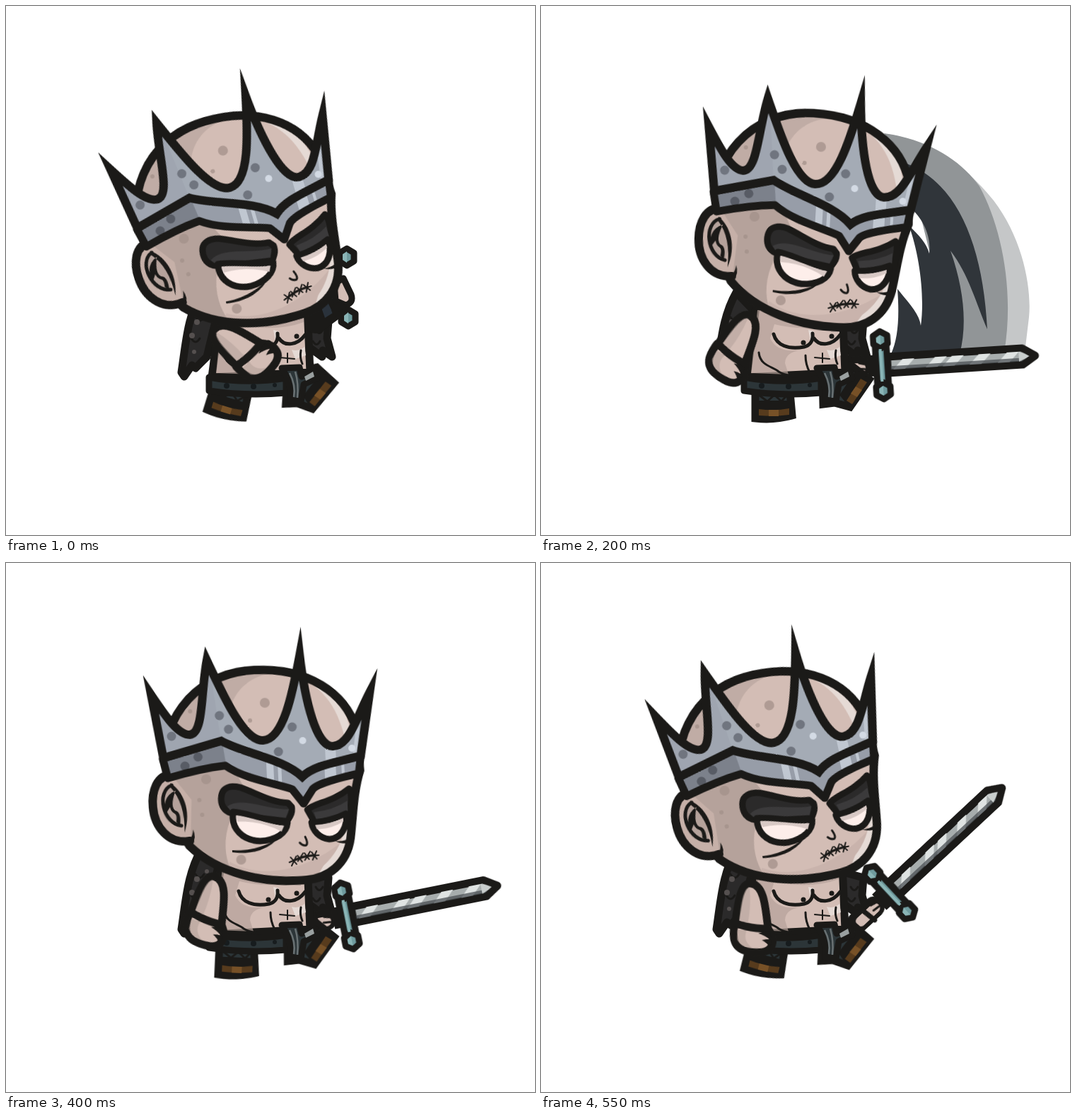
An HTML page without scripts that plays this animation: 748 px wide and 748 px high, repeating every 600 ms.

```html
<!DOCTYPE html>
<html lang="en">
<head>
<meta charset="utf-8">
<title>Sword swing</title>
<style>
  html, body { margin: 0; width: 100%; height: 100%; overflow: hidden; background: #fff; }
  svg { display: block; width: 100vw; height: 100vh; }

  .ink { stroke: #1b1a18; stroke-width: 11; stroke-linejoin: round; stroke-linecap: round; }
  .line { fill: none; }
  .w2 { stroke-width: 2; }
  .w3 { stroke-width: 3; }
  .w5 { stroke-width: 5; }
  .w9 { stroke-width: 9; }
  .w12 { stroke-width: 12; }
  .w30 { stroke-width: 30; }
  .spiked { stroke-linejoin: miter; stroke-miterlimit: 20; }
  .black { fill: #1b1a18; }
  .skin { fill: #d3bdb5; }
  .shade { fill: #b5a29b; }
  .glow { fill: #e5dad5; }
  .steel { fill: #a4abb5; }
  .teal { fill: #6f9b9e; }
  .cloth { fill: #2c3538; }
  .cape { fill: #2b2a2a; }
  .boot { fill: #573b1d; }

  /* Poses advance every 50 ms; steps(2) adds one in-between per 100 ms. */
  .head, .arm, .sword, .leg, .foot, .pommel, .fist { animation: 600ms steps(2) infinite; }
  .head { animation-name: nod; transform-origin: 365px 450px; }
  .arm { animation-name: arm; }
  .leg { animation-name: leg; transform-origin: 335px 515px; }
  .foot { animation-name: foot; transform-origin: 405px 525px; }
  .sword { animation-name: swing, drawn; animation-timing-function: steps(2), step-end; }
  .pommel { animation-name: drop, raised; animation-timing-function: steps(2), step-end; }
  .fist { animation-name: fist; animation-timing-function: step-end; }
  .slash { animation: slash 600ms step-end infinite; }

  @keyframes nod {
    0%, 100% { transform: translateX(0) rotate(-16.3deg); }
    16.6667% { transform: translateX(5px) rotate(-11.1deg); }
    33.3333% { transform: translateX(3px) rotate(3.4deg); }
    50%      { transform: translateX(1.5px) rotate(1.1deg); animation-timing-function: step-end; }
    58.3333% { transform: translateX(0) rotate(0deg); }
    75%      { transform: translateX(0) rotate(-5.5deg); }
    91.6667% { transform: translateX(0) rotate(-12.6deg); animation-timing-function: step-end; }
  }
  @keyframes arm {
    0%, 100% { transform: translate(305px, 468px) rotate(-46deg); }
    16.6667% { transform: translate(297px, 463px) rotate(0deg); }
    33.3333% { transform: translate(287px, 450px) rotate(34deg); }
    50%      { transform: translate(288px, 453px) rotate(27deg); animation-timing-function: step-end; }
    58.3333% { transform: translate(289px, 455px) rotate(24deg); }
    75%      { transform: translate(290px, 460px) rotate(14deg); }
    91.6667% { transform: translate(294px, 468px) rotate(6deg); animation-timing-function: step-end; }
  }
  @keyframes leg {
    0%, 100% { transform: rotate(17deg); }
    16.6667% { transform: rotate(8deg); }
    33.3333%, 58.3333% { transform: rotate(0deg); }
    75%      { transform: rotate(5deg); }
    91.6667% { transform: rotate(14deg); animation-timing-function: step-end; }
  }
  @keyframes foot {
    0%, 100% { transform: rotate(5deg); }
    16.6667%, 75% { transform: rotate(2deg); }
    33.3333%, 58.3333% { transform: rotate(0deg); }
    91.6667% { transform: rotate(4deg); animation-timing-function: step-end; }
  }
  @keyframes swing {
    0%, 25%  { transform: translate(505px, 455px) rotate(-50deg); animation-timing-function: step-end; }
    33.3333% { transform: translate(482px, 508px) rotate(-3.6deg); }
    50%      { transform: translate(480px, 508px) rotate(-3.4deg); animation-timing-function: step-end; }
    58.3333% { transform: translate(478px, 508px) rotate(-3deg); }
    75%      { transform: translate(486px, 490px) rotate(-19.7deg); }
    91.6667%, 100% { transform: translate(493px, 466px) rotate(-43deg); }
  }
  @keyframes drop {
    0%  { transform: translate(482px, 355px); }
    16.6667%, 100% { transform: translate(486px, 416px); }
  }
  @keyframes fist {
    0%  { visibility: visible; transform: none; }
    8.3333% { visibility: visible; transform: translate(-6px, 18px); }
    16.6667%, 100% { visibility: hidden; }
  }
  @keyframes drawn  { 0% { visibility: hidden; } 25%, 100% { visibility: visible; } }
  @keyframes raised { 0% { visibility: visible; } 25%, 100% { visibility: hidden; } }
  @keyframes slash  { 0%, 58.3333%, 100% { visibility: hidden; } 33.3333% { visibility: visible; } }
</style>
</head>
<body>
<svg viewBox="0 0 748 748">
  <defs>
    <path id="skull" d="M235,290C224,230 272,151 365,151C442,151 492,190 505,240L508,300C497,330 495,365 490,395C483,432 455,450 425,451C365,454 300,436 262,395C245,365 238,330 235,290Z"/>
    <path id="crown" d="M231,269L218,179C238,212 254,238 270,238C290,237 288,180 299,134C318,180 345,251 373,251C402,251 418,186 430.500,133C435,199 448,264 471,264C495,264 506,226 527,190L510,279C480,287 445,288 426,305C400,278 345,268 314,249Z"/>
    <path id="band" d="M230,270L314,249C345,268 400,278 426,305C445,288 480,287 510,279L506,304C480,309 448,315 440,323L426,343L411,322C390,313 345,305 318,284C290,286 260,292 236,298Z"/>
    <path id="blade" d="M8,-11.500H199L217,0L199,11.500H8Z"/>
    <path id="hex" d="M-10,-6L0,-12L10,-6V6L0,12L-10,6Z"/>
    <clipPath id="inSkull"><use href="#skull"/></clipPath>
    <clipPath id="inCrown"><use href="#crown"/></clipPath>
    <clipPath id="inBand"><use href="#band"/></clipPath>
    <clipPath id="inBlade"><use href="#blade"/></clipPath>
  </defs>

  <g class="slash">
    <path fill="#c5c7c8" d="M490,181C556,192 600,226 640,275C682,330 694,400 690,440L684,490H640L600,240Z"/>
    <path fill="#919597" d="M485,180C550,189 595,220 620,255C650,310 670,400 655,490H585L520,230Z"/>
    <path fill="#30353a" d="M515,222C590,250 625,340 631,457C615,420 605,380 579,346C598,400 603,450 592,492H495C505,470 507,440 504,400C520,420 535,435 537,452C543,410 535,350 520,310C535,325 545,335 549,350C552,325 540,300 520,283Z"/>
  </g>

  <!-- cape -->
  <g class="cape">
    <path class="ink" d="M276,405C256,440 254,480 248,518L252,524L263,508L268,512L284,496L300,430Z"/>
    <path class="ink" d="M420,435L456,445L454,470L461,496L448,487L447,496L425,480Z"/>
    <path class="ink line w3" d="M262,470q6,10 12,0M268,440q6,10 12,0M438,458q5,9 10,0M434,474q5,9 10,0"/>
    <g fill="#55504f"><circle cx="270" cy="447" r="4"/><circle cx="263" cy="466" r="4"/><circle cx="284" cy="436" r="3"/><circle cx="266" cy="489" r="3"/></g>
  </g>

  <!-- forearm holding the sword -->
  <g class="sword">
    <path class="ink line w30" d="M-62,0L-30,0"/>
    <path fill="none" stroke="#d3bdb5" stroke-width="14" stroke-linecap="round" d="M-58,2H-30"/>
    <path class="ink line" d="M-46,-14L-42,14" style="stroke-width:7"/>
    <path class="ink line w3" d="M-24,-3L-32,-5M-24,4L-34,3"/>
  </g>

  <!-- legs -->
  <g class="leg">
    <path class="ink cloth" d="M303,535V583Q330,586 355,579L351,535Z" style="stroke-linejoin:miter"/>
    <path class="ink line w3" d="M308,550l12,9l10,-9l10,9l8,-9"/>
    <path class="black" d="M303,558H354V571H303Z"/>
    <path class="boot" d="M308,570Q330,573 351,569V578Q330,581 308,579Z"/>
    <path fill="#775127" d="M322,571L336,571V580H322Z"/>
  </g>
  <g class="foot">
    <path class="ink cloth" d="M398,520L399,563L415,561L437,567L464,528L438,508Z" style="stroke-linejoin:miter"/>
    <path class="black" d="M422,550L446,514L466,528L438,570Z"/>
    <path class="boot" d="M432,558L452,527L461,532L440,563Z"/>
    <path fill="#775127" d="M438,548L445,538L454,543L447,553Z"/>
  </g>

  <!-- torso -->
  <path class="ink skin" d="M304,425L291,525L430,518L426,425Z"/>
  <path class="shade" d="M306,430H421V447Q380,462 330,450L324,470Q335,492 368,486Q345,490 345,505L350,521L297,519Z" opacity=".7"/>
  <path class="glow" d="M404,486q10,3 18,-4l2,12l-15,5zM378,458l8,2v12l-5,2z"/>
  <g class="ink line w5">
    <path d="M329,464C333,480 350,486 372,482C381,480 385,473 384,463M386,470C394,482 412,480 423,465"/>
    <path class="w3" d="M374,494Q374,507 380,518M417,487Q415,497 419,506M308,490C310,510 330,510 336,517Q344,522 353,522"/>
    <path class="w2" d="M387,497L408,499M398,491V504"/>
  </g>
  <circle class="black" cx="371" cy="476" r="3.500"/><circle class="black" cx="411" cy="467" r="3.500"/>

  <!-- belt -->
  <path class="ink cloth w9" d="M287,525Q340,535 396,526V547Q340,552 287,544Z"/>
  <g fill="#171c1e"><circle cx="312" cy="537" r="4"/><circle cx="350" cy="538" r="4"/><circle cx="380" cy="536" r="3"/></g>
  <path class="ink cloth w9" d="M390,512L415,511L418,524L437,517L440,526L421,535L417,559L402,557Q404,532 390,512Z"/>
  <path fill="#9aa0a0" d="M422,524L434,517L436,524L424,530Z"/>
  <path fill="none" stroke="#697173" stroke-width="2.500" d="M401,519Q410,536 407,553M409,517Q414,534 412,554"/>

  <!-- raised hilt -->
  <g class="fist">
    <path class="ink line w30" d="M438,448L465,428"/>
    <path fill="#2a323b" d="M445,424l10,-5l7,15l-11,7z"/>
    <path class="ink skin w9" d="M464,392L477,385L488,408Q492,420 480,423L466,417Z"/>
    <path class="ink line" style="stroke-width:20" d="M470,429L484,440"/>
    <use class="ink teal w9" href="#hex" x="484" y="441"/>
    <path fill="#8ab5b6" d="M478,438l6,-5v16l-6,-4z"/>
  </g>
  <g class="pommel">
    <path class="ink line" style="stroke-width:18" d="M-22,-1H0"/>
    <use class="ink teal w9" href="#hex"/>
    <path fill="#8ab5b6" d="M-6,-4L0,-8V8L-6,4Z"/>
  </g>

  <g class="sword">
    <path class="black" d="M-20,-15H14V15H-20Z"/>
    <use class="ink" href="#blade" fill="#a7adad"/>
    <g clip-path="url(#inBlade)">
      <path stroke="#dfe3e2" stroke-width="12" d="M42,-11l-22,22M88,-11l-22,22M112,-11l-22,22M150,-11l-22,22M190,-11l-22,22"/>
      <path fill="#4b5154" d="M8,2H205L196,12H8Z" opacity=".75"/>
      <path fill="#c9cecd" d="M194,-8L212,0L194,7Z"/>
    </g>
    <use class="ink line w9" href="#blade"/>
    <path class="ink teal w9" d="M-8,-31H8V31H-8Z"/>
    <use class="ink teal w9" href="#hex" y="-36"/>
    <use class="ink teal w9" href="#hex" y="36"/>
    <path fill="#8ab5b6" d="M-3,-23H1V23H-3ZM-6,-39L0,-43V-29L-6,-33ZM-6,33L0,29V43L-6,39Z"/>
  </g>

  <g class="arm">
    <path class="ink skin" d="M-16,44C-17,64 -14,80 8,81C24,82 38,80 40,68C42,58 37,52 32,46Z"/>
    <path class="shade" d="M-11,52L-10,66Q-4,76 14,76Q-2,68 2,52Z" opacity=".6"/>
    <path class="ink skin" d="M-15,43C-14,15 -14,-15 1,-15C20,-15 25,15 32,46Q8,49 -15,43Z"/>
    <path class="shade" d="M-10,39C-10,15 -9,-8 0,-10Q5,16 3,41Z" opacity=".55"/>
    <path class="black" d="M36,50Q28,50 19,54Q29,56 38,62ZM40,61Q32,60 25,63Q33,66 37,72Z"/>
  </g>

  <g class="head">
    <use class="skin" href="#skull"/>
    <g clip-path="url(#inSkull)">
      <path class="shade" d="M220,270L325,280L345,320L322,360Q306,395 318,430L345,460H240Z"/>
      <path class="shade" d="M225,260C260,160 320,140 392,156C345,162 322,190 318,260Z" opacity=".6"/>
      <path class="shade" d="M318,420C360,448 430,440 490,390V470H290Z" opacity=".35"/>
      <path class="glow" d="M420,150C470,170 492,205 498,250L489,255C480,205 458,175 415,158ZM495,380Q484,428 440,447L450,432Q474,412 481,385Z"/>
      <g fill="#a3918a" opacity=".75">
        <circle cx="290" cy="302" r="7"/><circle cx="279" cy="331" r="3"/><circle cx="282" cy="352" r="3"/>
        <circle cx="334" cy="418" r="7"/><circle cx="378" cy="198" r="7"/><circle cx="356" cy="222" r="3"/><circle cx="272" cy="205" r="3"/>
      </g>
    </g>
    <use class="ink line w12" href="#skull"/>

    <!-- ear -->
    <path fill="#c6b0a8" d="M240,292C219,293 212,318 213,338C214,365 232,390 264,388L268,330Z"/>
    <path class="ink line w12" d="M246,293C219,290 212,318 213,338C214,365 232,392 263,388"/>
    <path class="shade" d="M241,308C222,312 220,345 234,360L252,366L258,345Z"/>
    <path class="ink line w5" d="M252,366C226,362 218,316 241,308"/>
    <path class="black" d="M239,305C256,316 268,345 256,376C258,348 252,326 239,311ZM246,316C230,322 228,336 231,348L237,339C240,352 248,344 245,360L250,366C252,354 251,346 244,344C238,338 242,326 246,316ZM262,388Q268,380 268,372Q273,383 266,393Z"/>

    <!-- eyes -->
    <path class="ink cape w9" d="M310,330C311,313 326,312 338,316C360,325 380,339 404,341L409,347C410,356 406,360 402,366L322,351C314,348 309,340 310,330Z"/>
    <path fill="#3b3a3b" d="M318,342C340,328 375,350 405,350L400,362L323,349Z"/>
    <path class="ink w9" fill="#fdeeea" d="M326,350C346,352 378,368 402,369C400,384 384,393 362,393C338,391 321,374 326,350Z"/>
    <path fill="#d8c9c5" d="M330,355C350,358 378,371 397,373L393,381Q365,364 331,364Z"/>
    <path class="ink cape w9" d="M431,352C440,343 467,343 491,325C496,332 493,348 490,364L440,370Z"/>
    <path fill="#3b3a3b" d="M440,356Q468,354 488,342V358L443,367Z"/>
    <path class="ink w9" fill="#fdeeea" d="M436,370C452,371 472,366 485,360C487,378 477,395 460,395C446,393 437,382 436,370Z"/>
    <path fill="#d8c9c5" d="M441,374Q462,374 481,366V371Q463,381 443,380Z"/>
    <path class="black" d="M322,404Q352,408 386,392Q362,414 322,407ZM468,398Q480,400 490,394V401Q478,404 468,398Z"/>

    <!-- nose and stitched mouth -->
    <path class="ink line w3" d="M426,390Q430,399 427,402Q422,403 418,398"/>
    <path class="ink line w2" d="M402,425Q424,415 444,417M404,418L412,428M412,417L405,430M414,416L420,425M422,413L414,424M424,413L430,422M432,411L424,423M434,412L441,422M441,411L435,423"/>
    <path class="ink line w3" d="M408,423Q424,416 439,417"/>

    <!-- crown -->
    <use class="steel" href="#crown"/>
    <g clip-path="url(#inCrown)">
      <path fill="#9fa5b0" d="M200,100H298L314,252L220,290Z"/>
      <path fill="#c0c7d1" d="M428,130L434,150L454,250Q434,215 428,155ZM460,250H475V300H460ZM520,180L500,300H495L505,240Z"/>
      <g fill="#70757f">
        <circle cx="244" cy="239" r="6.500"/><circle cx="313" cy="213" r="6.500"/><circle cx="325" cy="233" r="6.500"/>
        <circle cx="415" cy="234" r="6.500"/><circle cx="394" cy="268" r="6.500"/>
      </g>
      <g fill="#d3dae4"><circle cx="429" cy="254" r="5"/><circle cx="498" cy="268" r="5"/></g>
    </g>
    <use fill="#979da8" href="#band"/>
    <g clip-path="url(#inBand)">
      <path fill="#7c818b" d="M220,240H314L320,290L225,305Z"/>
      <path fill="#c0c7d1" d="M376,270H386V320H376ZM392,270H397V325H392ZM458,270H474V320H458ZM482,270H486V320H482Z"/>
      <g fill="#585c65"><circle cx="261" cy="282" r="6.500"/><circle cx="280" cy="270" r="6.500"/></g>
    </g>
    <use class="ink line" href="#band"/>
    <use class="ink line w12 spiked" href="#crown"/>
  </g>
</svg>
</body>
</html>
```
